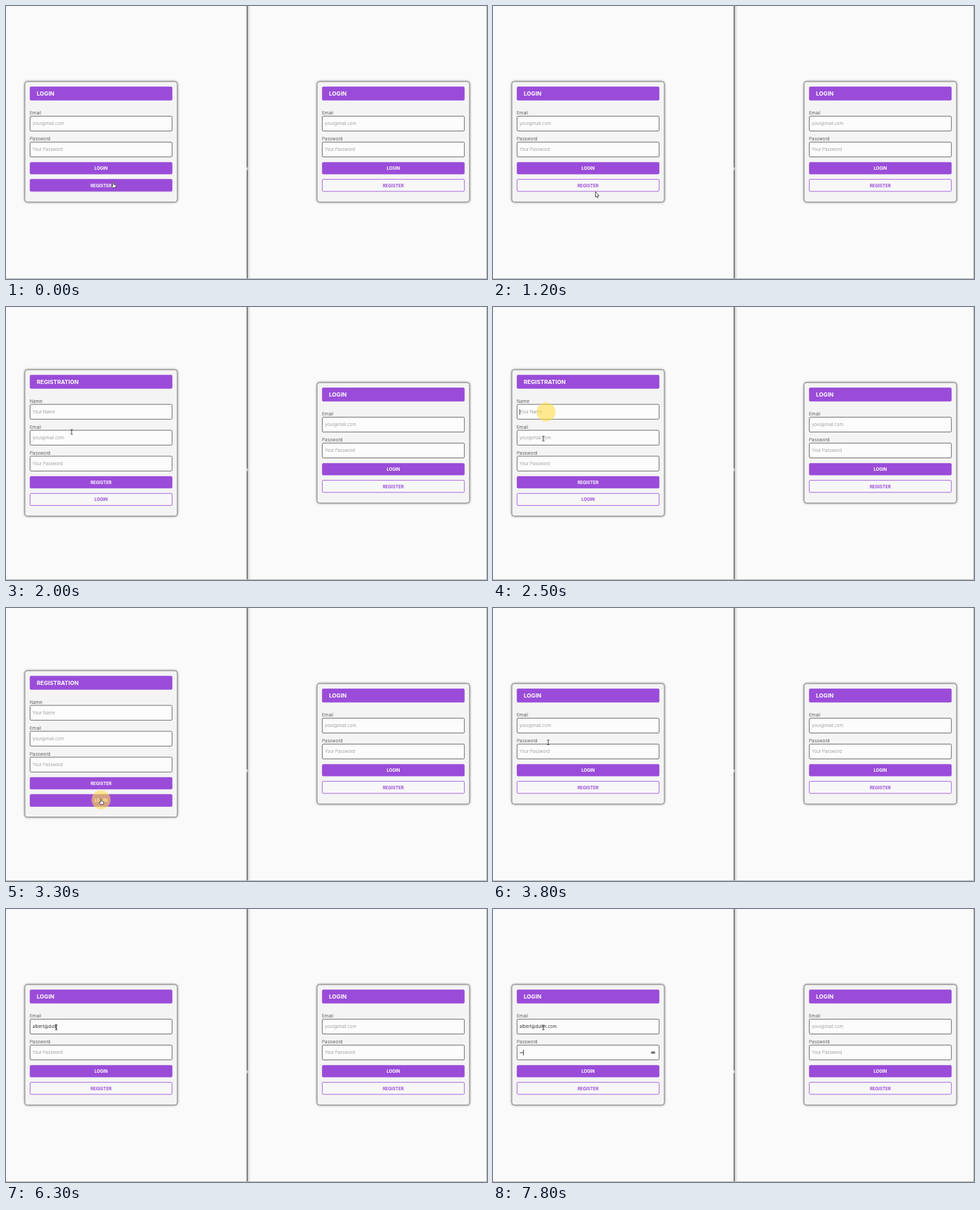
An HTML page that plays this animation: 688x390 px, repeating every 8 s.

```html
<!DOCTYPE html>
<html lang="en">
<head>
<meta charset="utf-8">
<title>Login and registration form</title>
<style>
html, body { margin: 0; width: 100%; height: 100%; overflow: hidden; background: #fafafa; }
svg { display: block; width: 688px; height: 390px; font-family: Inter, "Open Sans", sans-serif; }
.card { fill: #f4f4f4; stroke: #8c8c8c; filter: drop-shadow(0 0 1.5px #777); }
.box { fill: #fcfcfc; stroke: #666; stroke-width: .9; }
.main, .alt { stroke: #9a4cd9; stroke-width: .8; }
.main, .hover .alt { fill: #9a4cd9; }
.alt { fill: #f7f7f7; }
.title, .mainText, .hover .altText { fill: #fff; }
.altText { fill: #9a4cd9; }
.title { font-size: 8.1px; font-weight: 700; }
.mainText, .altText { font-size: 6.2px; font-weight: 700; text-anchor: middle; }
.label { font-size: 6.5px; font-weight: 300; fill: #333; }
.hint, .typed { font-size: 6.2px; }
.hint { fill: #858585; font-weight: 300; }
.typed { fill: #333; }
.pointer { fill: #fff; stroke: #333; stroke-width: .8; stroke-linejoin: round; }
</style>
</head>
<body>
<svg viewBox="0 0 688 390">
  <defs>
    <linearGradient id="shade">
      <stop stop-color="#000" stop-opacity=".2"/>
      <stop offset="1" stop-color="#000" stop-opacity="0"/>
    </linearGradient>
  </defs>
  <rect width="688" height="390" fill="#fafafa"/>
  <rect x="345" width="5" height="390" fill="url(#shade)"/>
  <path d="M345 0V390" stroke="#606060" stroke-width="1.5"/>
  <path d="M345 230.5V234.5" stroke="#ddd" stroke-width="1.5"/>
  <path d="M687.5 0V389.5H0" fill="none" stroke="#b8b8b8"/>
  <g id="login"></g>
  <g id="register"></g>
  <g id="other" transform="translate(418)"></g>
  <text id="email" class="typed" x="38" y="170.1"></text>
  <g id="dots" fill="#333"></g>
  <g id="eye">
    <path d="M225.6 205.2Q229 201 232.4 205.2Q229 209.4 225.6 205.2Z" fill="#444"/>
    <circle cx="229" cy="205.2" r="1.5" fill="#444" stroke="#fff" stroke-width=".6"/>
  </g>
  <path id="caret" d="M0 -4V4" stroke="#222" stroke-width=".8"/>
  <circle id="click" r="13.5" fill="#ffdc46" fill-opacity=".6"/>
  <g id="cursor">
    <path id="arrow" class="pointer" d="M0 0V7.6L1.7 6.1L2.9 8.8L4.1 8.3L2.9 5.7H5.2Z"/>
    <path id="hand" class="pointer" d="M-.8 0Q0 -1 .8 0V3L3 3.4Q3.9 3.6 3.8 4.5L3.2 7.6H-1L-2.8 4.9Q-2.6 3.9 -1.6 4.5L-.8 5.2Z"/>
    <path id="beam" d="M-1.7 -3.3H-.5L0 -2.9L.5 -3.3H1.7M0 -2.9V2.9M-1.7 3.3H-.5L0 2.9L.5 3.3H1.7" fill="none" stroke="#222" stroke-width=".8"/>
  </g>
</svg>
<script>
const LOOP = 8000, TICK = 100, ADDRESS = 'albert@dulim.com';
const $ = id => document.getElementById(id);
const HINTS = { Name: 'Your Name', Email: 'your@mail.com', Password: 'Your Password' };
const FORMS = {
  login: { top: 108, title: 'LOGIN', fields: ['Email', 'Password'], buttons: ['LOGIN', 'REGISTER'] },
  register: { top: 89.7, title: 'REGISTRATION', fields: ['Name', 'Email', 'Password'], buttons: ['REGISTER', 'LOGIN'] }
};

const rect = (cls, x, y, w, h, r = 1.5) =>
  `<rect class="${cls}" x="${x}" y="${y}" width="${w}" height="${h}" rx="${r}"/>`;
const text = (cls, x, y, s) => `<text class="${cls}" x="${x}" y="${y}">${s}</text>`;
const buttonTop = form => form.top + 41 + 37 * form.fields.length;

function drawForm({ top, title, fields, buttons }) {
  const end = top + 41 + 37 * fields.length;
  return rect('card', 27, top, 218, end - top + 57, 3.5) +
    rect('main', 34.4, top + 7.6, 203.2, 19) + text('title', 44, top + 20.2, title) +
    fields.map((name, i) => {
      const y = top + 49.4 + 37 * i;
      return text('label', 34, y - 2, name) + rect('box', 34.4, y, 203.2, 21.2) +
        (name === 'Email' && title === 'LOGIN' ? '' : text('hint', 38, y + 12.7, HINTS[name]));
    }).join('') +
    rect('main', 34.4, end + .4, 203.2, 16.6) + text('mainText', 136, end + 10.9, buttons[0]) +
    rect('alt', 34.4, end + 24.6, 203.2, 17.2) + text('altText', 136, end + 35.6, buttons[1]);
}

for (const id in FORMS) $(id).innerHTML = drawForm(FORMS[id]);
$('other').innerHTML = drawForm(FORMS.login) + text('hint', 38, 170.1, HINTS.Email);
const passwordHint = $('login').querySelector('.hint');

// [time, x, y]
const PATH = [
  [0, 153.5, 252], [200, 154, 254], [600, 150, 272], [1000, 149, 274], [1200, 146.5, 265.3],
  [1300, 146.5, 265.3], [1400, 146, 259], [1600, 145, 259.4], [2200, 76, 150], [2400, 76, 150],
  [2500, 72, 188], [2800, 96, 226], [3100, 134, 264], [3200, 136, 272], [3400, 136, 274],
  [3800, 79, 192], [4100, 72, 169.3], [LOOP, 72, 169.3]
];
// [start, end, x, y]
const CLICKS = [[1400, 1600, 147, 259], [2300, 2600, 76, 150], [3300, 3500, 136, 274], [4100, 4400, 71, 168]];
const KEYS = [4800, 4900, 5000, 5100, 5200, 5300, 5700, 5900, 6100, 6200, 6300, 6500, 6600, 6700, 6800, 7000];
const DOTS = [7500, 7700, 7800];

const show = (id, on) => $(id).style.display = on ? '' : 'none';
const place = (id, x, y) => $(id).setAttribute('transform', `translate(${x} ${y})`);
const within = (t, a, b) => t >= a && t < b;
const count = (times, t) => times.filter(k => k <= t).length;

function pointerAt(t) {
  const i = PATH.findIndex(p => p[0] > t);
  const [t0, x0, y0] = PATH[i - 1], [t1, x1, y1] = PATH[i];
  const k = (t - t0) / (t1 - t0), e = k * k * (3 - 2 * k);
  return [x0 + (x1 - x0) * e, y0 + (y1 - y0) * e];
}

function draw(t) {
  const registering = within(t, 1500, 3400);
  const form = registering ? FORMS.register : FORMS.login;
  show('login', !registering);
  show('register', registering);

  const [x, y] = pointerAt(t), end = buttonTop(form);
  const onAlt = within(y, end + 24, end + 42);
  const kind = onAlt || within(y, end, end + 17.5) ? 'hand'
    : within(y, form.top + 42, end - 7) ? 'beam' : 'arrow';
  for (const id of ['arrow', 'hand', 'beam']) show(id, id === kind);
  place('cursor', x, y);
  $('login').classList.toggle('hover', onAlt);
  $('register').classList.toggle('hover', onAlt);

  const click = CLICKS.find(c => within(t, c[0], c[1]));
  show('click', click);
  if (click) place('click', click[2], click[3]);

  const typed = count(KEYS, t), dots = count(DOTS, t), email = $('email');
  email.textContent = typed ? ADDRESS.slice(0, typed) : HINTS.Email;
  email.setAttribute('class', typed ? 'typed' : 'hint');
  show('email', !registering);
  $('dots').innerHTML = Array.from({ length: dots },
    (_, i) => `<circle cx="${39 + i * 1.7}" cy="205.3" r=".7"/>`).join('');
  passwordHint.style.display = dots ? 'none' : '';
  show('eye', dots);

  show('caret', within(t, 2300, 2800) || within(t, 4100, 4600) || t >= 4800);
  if (t < 4100) place('caret', 38.3, 150);
  else if (t < 7100) place('caret', 38.4 + (typed ? email.getComputedTextLength() : 0), 168);
  else place('caret', 38.4 + dots * 1.7, 205);
}

function frame() {
  draw(Math.floor(performance.now() % LOOP / TICK) * TICK);
  requestAnimationFrame(frame);
}
frame();
</script>
</body>
</html>
```
